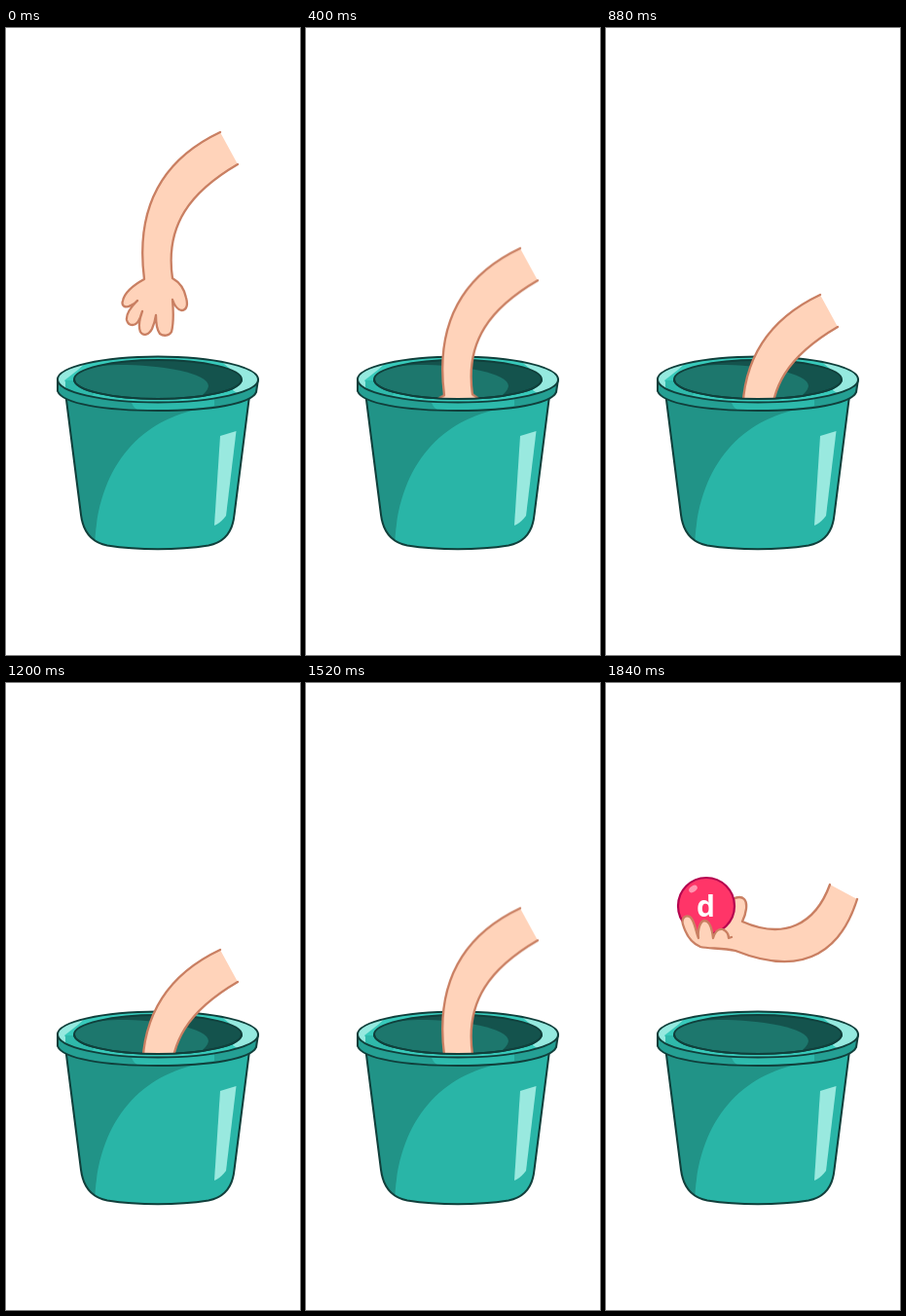
An HTML page without scripts for the animation above (2000 ms loop, 302 by 644 pixels).

```html
<!DOCTYPE html>
<html lang="en">
<head>
<meta charset="utf-8">
<title>Bucket draw</title>
<style>
  html, body { margin: 0; width: 100%; height: 100%; overflow: hidden; background: #fff; }
  svg { display: block; width: 100%; height: 100%; }

  .line { fill: none; stroke: #103f3b; stroke-width: 2; stroke-linejoin: round; }
  .skin { fill: #ffd3ba; }
  .edge { fill: none; stroke: #c97f62; stroke-width: 2.3; stroke-linecap: round; stroke-linejoin: round; }

  .reach, .stir, .catch { animation: 2s -5ms infinite; }
  .reach { animation-name: reach; }
  .stir { animation-name: stir; transform-origin: 229px 123px; }
  .catch { animation-name: catch; visibility: hidden; }

  /* the picture advances every 80 ms */
  @keyframes reach {
    0% { transform: translateY(0); visibility: visible; animation-timing-function: steps(7); }
    28% { transform: translateY(167px); animation-timing-function: step-end; }
    60% { transform: translateY(167px); animation-timing-function: steps(7); }
    88% { transform: translateY(92.3px); visibility: visible; animation-timing-function: step-end; }
    92%, 100% { transform: translateY(92.3px); visibility: hidden; }
  }
  @keyframes stir {
    0%, 28%, 44%, 60%, 100% { transform: rotate(0deg); animation-timing-function: steps(2); }
    36% { transform: rotate(4deg); animation-timing-function: steps(2); }
    52% { transform: rotate(-4deg); animation-timing-function: steps(2); }
  }
  @keyframes catch {
    0% { visibility: hidden; animation-timing-function: step-end; }
    92%, 100% { visibility: visible; animation-timing-function: step-end; }
  }
</style>
</head>
<body>
<svg viewBox="0 0 302 644">
  <defs>
    <path id="body" d="M61.500 378L77 500C79 516 86 528 104 531.500C136 536.500 176 536.500 208 531.500C226 528 233 516 234.500 500L250 378Z"/>
    <path id="lip" d="M53 361V373C58 386 101 393 156 393S252 386 257 374L259 361Z"/>
    <ellipse id="rim" cx="156" cy="361" rx="103" ry="23.500"/>
    <ellipse id="hole" cx="156" cy="361" rx="86" ry="20"/>
    <clipPath id="inBody"><use href="#body"/></clipPath>
    <clipPath id="inLip"><use href="#lip"/></clipPath>
    <clipPath id="inRim"><use href="#rim"/></clipPath>
    <clipPath id="inHole"><use href="#hole"/></clipPath>
    <clipPath id="mouth"><path d="M0 0H302V361H242A86 20 0 0 1 70 361H0Z"/></clipPath>
    <path id="arm" d="M220 107C165 133 132 180 142 258C131 264 122 271 120 280C118 286 123 288 128 285Q133 283 135 280C128 287 123 294 124 300C126 307 133 306 136 301Q139 296 140 291C137 299 136 307 138 312C141 317 147 315 150 309Q153 302 154 295C154 303 155 310 158 314C162 317 168 316 170 312C172 304 172 290 171 279C173 285 176 289 180 290C186 290 187 284 185 277C183 267 178 261 171 257C163 202 190 168 238 140"/>
    <path id="foreUp" d="M230 207C215 248 183 264 140 245C144 237 146 226 142 222C139 219 134 220 130 222"/>
    <path id="foreLow" d="M258 222C243 270 208 305 133 275"/>
    <path id="fingers" d="M133 275C120 272 105 273 97 271C87 267 82 258 79 248C77 241 82 238 86 240C91 243 92 255 95 262C94 255 96 245 101 244C107 244 109 253 110 262C112 255 116 252 120 253C124 255 126 258 126 262L129 261"/>
  </defs>

  <g clip-path="url(#inBody)">
    <use href="#body" fill="#29b5a7"/>
    <path d="M50 370H215V389C140 396 91 450 91 540H50Z" fill="#219387"/>
  </g>
  <path d="M220 419L236.500 414L226 501Q220 509 214 511Z" fill="#99e9df"/>
  <use href="#body" class="line"/>

  <g clip-path="url(#inLip)">
    <use href="#lip" fill="#249f93"/>
    <path d="M129 385Q132 392 139 394Q182 394 214 388V379Q180 385 129 385Z" fill="#2dbaac"/>
  </g>
  <use href="#lip" class="line"/>

  <g clip-path="url(#inRim)">
    <use href="#rim" fill="#38cabb"/>
    <path d="M50 335H92L74 351L60 362L67 374L50 372Z" fill="#95e9df"/>
    <path d="M61 362H72L91 376L83 381Q65 376 61 370Z" fill="#2fb9ab"/>
    <path d="M218 340L235 354L242 362L233 372L242 378L264 368V345Z" fill="#95e9df"/>
  </g>
  <use href="#rim" class="line"/>

  <g clip-path="url(#inHole)">
    <use href="#hole" fill="#14534d"/>
    <path d="M68 384V356Q88 346 115 346C160 346 208 354 208 368Q207 375 192 384Z" fill="#1d776d"/>
  </g>
  <use href="#hole" class="line"/>

  <g clip-path="url(#mouth)">
    <g class="reach">
      <g class="stir">
        <use href="#arm" class="skin"/>
        <use href="#arm" class="edge"/>
      </g>
    </g>
  </g>
  <path d="M242 361A86 20 0 0 1 70 361" class="line"/>

  <g class="catch">
    <path class="skin" d="M230 207C215 248 183 264 140 245C144 237 146 226 142 222C139 219 134 220 130 222L100 250L97 271L133 275C208 305 243 270 258 222Z"/>
    <use href="#foreUp" class="edge"/>
    <use href="#foreLow" class="edge"/>
    <circle cx="103" cy="229" r="29" fill="#ff3568" stroke="#b5054f" stroke-width="2.200"/>
    <ellipse cx="89.500" cy="211.500" rx="4.800" ry="3" transform="rotate(-35 89.500 211.500)" fill="#ff96b0"/>
    <text x="102.500" y="239.500" text-anchor="middle" font-family="'Open Sans', 'Noto Sans', sans-serif" font-weight="700" font-size="30" fill="#fff">d</text>
    <use href="#fingers" class="skin"/>
    <use href="#fingers" class="edge"/>
  </g>
</svg>
</body>
</html>
```
